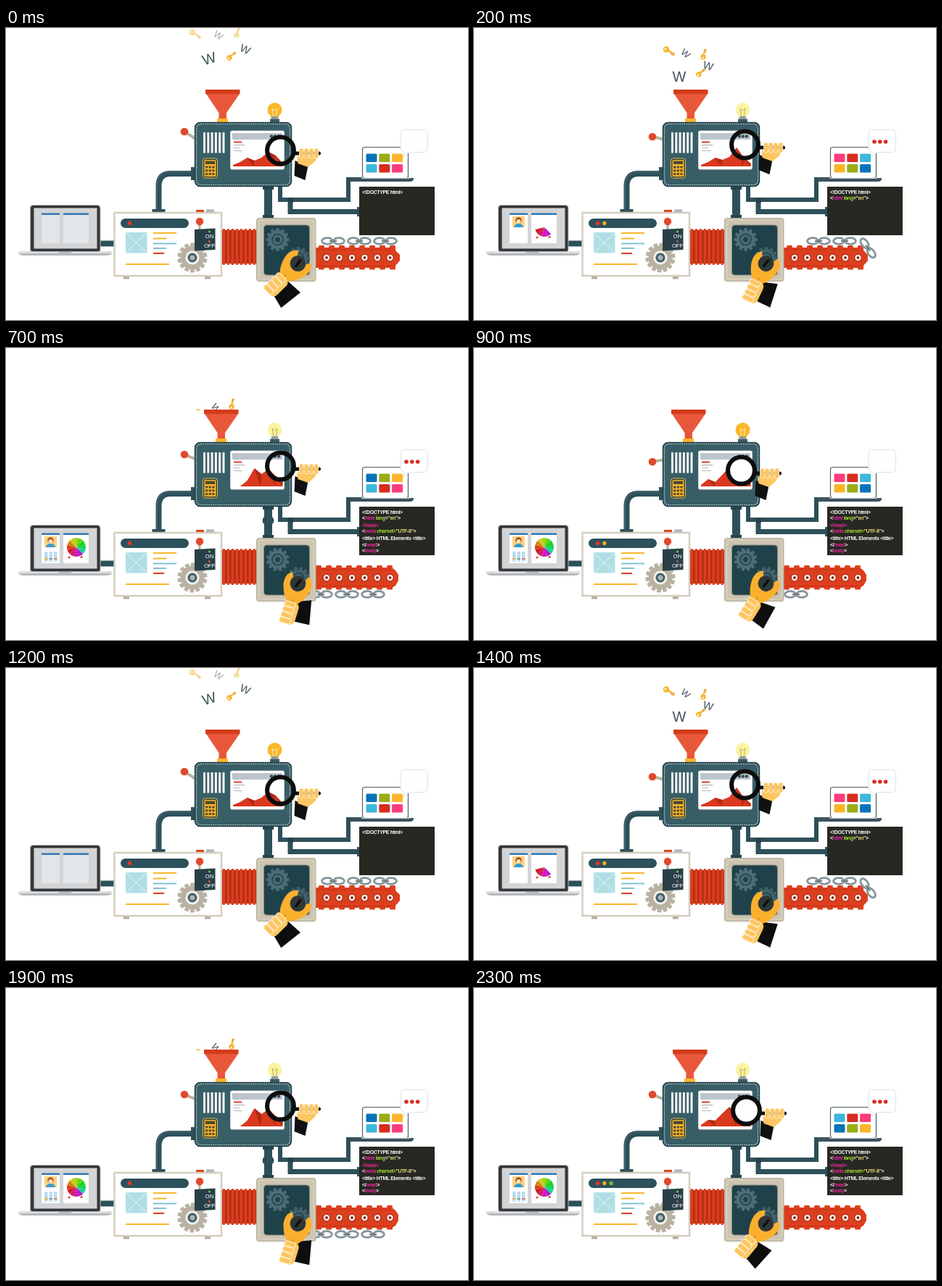
These frames come from a looping animation (637 px wide and 403 px high, 2.4 s). An HTML page:

```html
<!DOCTYPE html>
<html lang="en">
<head>
<meta charset="utf-8">
<title>Web machine</title>
<style>
html, body { margin: 0; width: 100%; height: 100%; overflow: hidden; background: #fff; }
svg { display: block; width: 637px; height: 403px; font-family: "Liberation Sans", Arial, sans-serif; }
</style>
</head>
<body>
<svg id="stage" viewBox="0 0 637 403"></svg>
<script>
const TEAL = '#2d505a', DEEP = '#26434c', RED = '#dc3f1e', DARK_RED = '#b02c15';
const AMBER = '#fbb72b', BEIGE = '#cbc4b1', SKIN = '#fdc662';
const STEP = 100, STEPS = 12;
const KEY_STEPS = [0, 2, 5, 7, 9, 11];

const rect = (x, y, w, h, fill, more = '') =>
  `<rect x="${x}" y="${y}" width="${w}" height="${h}" fill="${fill}" ${more}/>`;
const disc = (x, y, r, fill, more = '') => `<circle cx="${x}" cy="${y}" r="${r}" fill="${fill}" ${more}/>`;
const shape = (d, fill, more = '') => `<path d="${d}" fill="${fill}" ${more}/>`;
const line = (d, color, width, more = '') =>
  `<path d="${d}" fill="none" stroke="${color}" stroke-width="${width}" ${more}/>`;
const group = (transform, body, more = '') => `<g transform="${transform}" ${more}>${body}</g>`;
const label = (x, y, size, body, more = '') =>
  `<text x="${x}" y="${y}" font-size="${size}" ${more}>${body}</text>`;
const range = (n, f) => Array.from({ length: n }, (_, i) => f(i)).join('');

// Linear interpolation through values given at KEY_STEPS
function keyed(s, values) {
  let i = 0;
  while (i < 4 && s > KEY_STEPS[i + 1]) i++;
  const p = (s - KEY_STEPS[i]) / (KEY_STEPS[i + 1] - KEY_STEPS[i]);
  return values[i] + (values[i + 1] - values[i]) * p;
}

function gear(x, y, r, teeth, angle, fill, hub) {
  const spokes = range(teeth, i =>
    rect(-r * .14, -r, r * .28, r, fill, `rx="1" transform="rotate(${i * 360 / teeth})"`));
  return group(`translate(${x} ${y}) rotate(${angle})`, spokes + disc(0, 0, r * .8, fill) + hub);
}

function pie(count) {
  const at = i => {
    const a = (45 + i * 30) * Math.PI / 180;
    return `${97 + 13 * Math.cos(a)} ${275 + 13 * Math.sin(a)}`;
  };
  return range(count, i =>
    shape(`M97 275L${at(i)}A13 13 0 0 1 ${at(i + 1)}Z`, `hsl(${290 + i * 21} 80% 46%)`));
}

function leftLaptop(s) {
  let out = line('M130 297.5H149', TEAL, 8) +
    rect(33.5, 244.5, 96.5, 65, '#343638', 'rx="4" stroke="#b5b8ba"') +
    rect(38.5, 248.5, 87, 56, '#d3d4d5') +
    shape('M17 308.5H146V311Q144 314 138 314H25Q19 314 17 311Z', '#b4b8bb') +
    rect(17, 308.5, 129, 2.5, '#dfe1e2') + rect(72, 308.5, 18, 2, '#a5a8aa');
  for (const [x, w] of [[49, 25], [79, 35]])
    out += rect(x, 256, w, 41, s ? '#fff' : '#e3e6e9') + rect(x, 255.5, w, 2.5, '#2f78b7');
  if (s) out += rect(53, 260, 17, 15, '#ffd27a') + disc(61.5, 265.5, 4.2, '#a84a23') +
    disc(61.5, 267, 3, '#ffe1bd') + shape('M55 275Q56 270 61.5 270T68 275Z', '#3a9bd0');
  if (s > 2) out += range(3, i => rect(53 + i * 6.5, 281, 4.5, 13.5, '#bcdcf0') +
    rect(53 + i * 6.5, 290, 4.5, 2, ['#e8b64a', '#5aa3d0', '#dd7a5c'][i]));
  out += pie(Math.round(keyed(s, [0, 4, 10, 12, 12, 12])));
  if (s > 1) out += disc(87, 289, 1.6, '#e0452a') + disc(104, 288.5, 1.6, '#e0452a');
  return out;
}

function whiteMachine(s) {
  const lamps = Math.floor(s % 6 / 2) + 1;
  const lines = [[203, 283, 32, AMBER], [203, 290.5, 18, AMBER], [203, 297.5, 32, '#7cc4d0'],
    [203, 304, 18, '#7cc4d0'], [203, 311, 15, RED], [165, 326, 60, AMBER]];
  const hub = disc(0, 0, 9.5, '#f4f2ec') + disc(0, 0, 5, '#a9b3b2', 'stroke="#40606a" stroke-width="3"');
  return rect(162, 342, 8, 4.5, '#b8ae99') + rect(274, 342, 8, 4.5, '#b8ae99') +
    rect(262, 251, 11, 4, RED) + rect(276, 250.5, 11, 4.5, '#a9b6c0') +
    rect(149.5, 255, 147.5, 87, '#fff', `stroke="${BEIGE}" stroke-width="2.4"`) +
    rect(149.5, 255, 147.5, 87, 'none', 'stroke="#fff" stroke-dasharray="1 2"') +
    rect(158, 263, 94, 13, TEAL, 'rx="6.5"') +
    range(lamps, i => disc(170.5 + i * 9.3, 269.5, 2.7, ['#e33a22', '#f9a825', '#72c043'][i])) +
    rect(165, 282, 29.5, 28.5, '#b0dee4') + line('M165 282L194.5 310.5M194.5 282L165 310.5', '#e6f6f7', 1) +
    lines.map(([x, y, w, c]) => rect(x, y - 1, w, 2, c)).join('') +
    gear(257, 317, 20.5, 14, s * 15, '#b9b2a3', hub) +
    rect(265.5, 267, 3, 12, '#b3ab9b') +
    shape('M260 278L288.5 276.5V306L260 307.5Z', '#293f48') +
    disc(267, 267, 5.2, '#e2482c') + disc(280.5, 281, 1.6, '#79c447') + disc(280.5, 294.5, 1.4, '#c96a3b') +
    label(280.5, 290, 8, 'ON', 'fill="#fff" text-anchor="middle"') +
    label(280.5, 303, 8, 'OFF', 'fill="#fff" text-anchor="middle" letter-spacing="-.3"');
}

function pipes(s) {
  const bulge = s > 5 && s < 9 ? `<ellipse cx="361.5" cy="${238 + (s - 7) * 11}" rx="8" ry="7" fill="${TEAL}"/>` : '';
  return line('M260 201H227Q210.5 201 210.5 218V254', TEAL, 8) +
    line('M258 198.5H227Q208 199 208 218V250', '#527078', 1) +
    rect(255, 192, 5, 18, TEAL) + rect(201.5, 250, 18, 5, TEAL) +
    line('M378 219V237H472V209H495', TEAL, 6) + line('M392 237V253.5H488', TEAL, 7) +
    rect(389, 234, 7, 7, DEEP) + rect(484, 247, 4, 13, TEAL) +
    rect(356, 219, 11, 44, TEAL) + rect(354, 219, 15, 4, DEEP) + rect(354, 258, 15, 4, DEEP) + bulge;
}

function drops(s) {
  const key = (x, y, a, size = 1) => group(`translate(${x} ${y}) rotate(${a}) scale(${size})`,
    line('M3 0H14M10 0V3M13 0V3', '#eea62c', 2.4) + disc(0, 0, 4.6, '#f7b733') + disc(-1.5, 0, 1.4, '#fff'));
  const letter = (x, y, a, size) => group(`translate(${x} ${y}) rotate(${a})`,
    label(0, size * .36, size, 'W', 'text-anchor="middle" fill="#40535b"'));
  if (s > 7) return '';
  const fade = `opacity="${Math.min(1, .5 + s * .25)}"`;
  const body = `<g ${fade}>` + key(257 + Math.min(s, 2) * 4, 6 + s * 11.8, 30, .95) +
    letter(293 - s * .5, keyed(s, [10, 35, 70, 83, 0, 0]), 35 + s * 3, 13) +
    key(318 - s, keyed(s, [10, 40, 71, 81, 0, 0]), -75 - s, .8) + '</g>' +
    letter(330 - s * 3.5, 29 + s * 11.5, 25 - s * 4, 15) +
    key(308 + s, 41 + s * 11.5, -45, .8) +
    letter(280 + s * 1.5, 42 + s * 12.5, -18 + s * 9, 20);
  return `<clipPath id="sky"><path d="M0 0H637V86H0Z"/></clipPath><g clip-path="url(#sky)">${body}</g>`;
}

function funnel(s) {
  return group(`translate(${Math.round(keyed(s, [0, 0, -2, -2, -3, -1]))} 0)`,
    rect(275, 85, 47.5, 6, '#d33c1d') + shape('M276 91H322L304 117V126H293.5V117Z', '#e9573a') +
    rect(291, 125, 15, 5.5, AMBER));
}

function bulb(lit) {
  const glass = lit ? '#fbb829' : '#fbf3a4';
  return disc(370.5, 113, 10, glass) + shape('M363 117H378L375 125H366Z', glass) +
    line('M367 111L369 123M374 111L372 123M367 111L370.5 114L374 111', lit ? '#fff0c0' : '#b9ae58', 1) +
    rect(366, 122, 9, 3.5, '#8d9aa0') + rect(364, 125.5, 13, 5, '#3e5a65');
}

function chart(s) {
  const poses = [[2, 2, 3, 0, 2, 2], [6, 6, 14, 0, 10, 9], [12, 12, 25, 8, 6, 8], [8, 9, 14, 25, 16, 18],
    [12, 13, 18, 17, 27, 27], [20, 26, 12, 24, 16, 16], [15, 12, 8, 14, 20, 10], [4, 4, 4, 8, 10, 6]];
  const top = poses.map((h, i) => [313 + i * 9.8, 191 - keyed(s, h)]);
  const shade = top.slice(1, 7).map(([x, y], i) => {
    const next = top[i + 2];
    return next[1] > y ? shape(`M${x} ${y}L${next}L${x + 9} 191L${x + 4} ${(y + 191) / 2}Z`, DARK_RED) : '';
  }).join('');
  return shape(`M313 191L${top.join('L')}V191Z`, '#da381f') + shade;
}

function topMachine(s) {
  const leverY = keyed(s, [143, 150, 147, 147, 157, 147]);
  return line(`M246 ${leverY}L263 154`, '#bdb29c', 4) + disc(246, leverY, 5.3, '#df4a2d') +
    drops(s) + funnel(s) + bulb(s % 4 < 2) +
    rect(260.5, 130.5, 133, 88, '#385e67', `rx="7" stroke="${DEEP}" stroke-width="1.5"`) +
    rect(262.5, 132.5, 129, 84, 'none', 'rx="6" stroke="#d3dedf" stroke-width="1.2" stroke-dasharray="1.5 1.5"') +
    range(6, i => rect(272 + i * 5.3, 144, 3, 28.5, '#f3f5f3')) +
    rect(271.5, 180, 20, 27, DEEP, `rx="3" stroke="${AMBER}"`) + rect(273.5, 182, 16, 23, AMBER, 'rx="1.5"') +
    rect(275, 183.5, 13, 4.5, '#4a4a33') +
    range(9, i => rect(275 + i % 3 * 4.6, 190.5 + Math.floor(i / 3) * 4.8, 3.4, 3, '#5d512b')) +
    rect(309.5, 142, 74, 53, '#fff', 'rx="2" stroke="#d4d9da"') + rect(312, 145, 69, 9, '#bcc5cb') +
    range(3, i => disc(366 + i * 5, 149.5, 2.2, '#344f59')) +
    rect(314, 156.5, 11, 2, RED) + rect(314, 161, 15, 1, '#aaa') + rect(314, 165, 9, 1, '#bbb') +
    rect(314, 169, 12, 1, '#bbb') + chart(s);
}

function hand() {
  return rect(-14, -8, 28, 18, SKIN, 'rx="6"') +
    range(4, i => rect(-14 + i * 7, -9, 6.3, 14, SKIN, 'rx="3" stroke="#fff3d2" stroke-width=".9"'));
}

function magnifier(s) {
  const i = s % 6;
  const x = [378.5, 378.5, 373.5, 368.5, 371, 375.5][i], y = [169, 163, 161, 169, 171, 169][i];
  return group(`translate(${x} ${y})`,
    shape('M20 14L38 21L34 41L19 35Z', '#111') +
    line('M20 4L53 4', '#111', 5, 'stroke-linecap="round"') +
    shape('M23 9L31 6H49Q51 14 44 18L38 23L24 18Z', SKIN) +
    range(4, j => rect(26 + j * 6.8, -3, 5.8, 14, SKIN, 'rx="2.8" stroke="#fff3d2" stroke-width=".8"')) +
    disc(0, 0, 18.4, i > 2 ? '#fff' : 'none', 'stroke="#0d0d0d" stroke-width="6"'));
}

function bellows() {
  return range(8, i => rect(298 + i * 6, 279, 6, 46, DARK_RED) +
    rect(298.5 + i * 6, 277, 3.8, 50, RED, 'rx="1.6"'));
}

function gearBox(s) {
  const hub = disc(0, 0, 7.5, 'none', 'stroke="#1f414a" stroke-width="1.6"') + disc(0, 0, 3.5, '#1f414a');
  return rect(345.5, 262.5, 81.5, 87, BEIGE, 'rx="3" stroke="#b5ad99"') +
    rect(348.5, 265.5, 76, 81, 'none', 'stroke="#ddd6c5" rx="2"') +
    rect(355.5, 272, 63, 69, '#1f414a', 'rx="4" stroke="#8f8b7c"') +
    gear(374.5, 292, 16, 12, s * 15, '#4d6d75', hub) +
    gear(403, 318, 16, 12, -s * 15, '#40606a', hub);
}

// Position and heading on the track around the saw bar
function track(d) {
  if (d < 94) return [432 + d, 294, 0];
  if (d > 163) return [526 - (d - 163), 340, 180];
  const a = (d - 94) / 69 * Math.PI;
  return [526 + 21 * Math.sin(a), 317 - 23 * Math.cos(a), a * 180 / Math.PI];
}

function saw(s) {
  const tail = keyed(s, [4, 28, 139, 168, 230, 300]);
  const link = x => `<ellipse cx="${x}" rx="7.5" ry="4.3" fill="none" stroke="#85949a" stroke-width="2.8"/>`;
  const chain = range(3, i => {
    const d = tail + 15 + i * 36;
    if (d > 263) return '';
    const [x, y, a] = track(d);
    return group(`translate(${x} ${y}) rotate(${a})`, link(-8) + link(8) + line('M-5 0H5', '#6f7d83', 2));
  });
  const shift = s % 2 * 4;
  const teeth = range(8, i => rect(431 + i * 14 - shift, 300, 8, 33.5, RED, 'rx="1.5"'));
  return `<clipPath id="bar"><path d="M427 296H550V340H427Z"/></clipPath><g clip-path="url(#bar)">${teeth}</g>` +
    shape(`M427 303H532L537 307L${543 - shift / 2} 313V321L537 328L532 331H427Z`, RED) +
    line('M428 306H531M428 328.5H531', '#c73317', 1.2) +
    range(6, i => disc(442 + i * 17.5, 317, 4.8, '#fff', `stroke="${DARK_RED}" stroke-width="1.3"`) +
      disc(442 + i * 17.5, 317, 2, '#9c2d1d')) + chain;
}

function wrench(s) {
  const angle = keyed(s, [136, 115, 103, 107, 122, 130]), a = angle * Math.PI / 180;
  const x = 402.5, y = 325, hx = x + 42 * Math.cos(a), hy = y + 42 * Math.sin(a);
  const jaw = 'M-13 -12Q-7 -22 8 -18.5Q20 -15 27 -8H42V8H27Q20 15 8 18.5Q-7 22 -13 12L-7 8.5A11 11 0 1 0 -7 -8.5Z';
  return group(`translate(${hx} ${hy}) rotate(${(angle - 107) * 1.6})`,
      shape('M8 -15L31 -17L28 17L6 12Z', '#0e0e0e')) +
    disc(x, y, 10.5, '#303536') + line(`M${x - 4} ${y + 5}L${x + 4} ${y - 5}`, '#0c0c0c', 3) +
    group(`translate(${x} ${y}) rotate(${angle})`, shape(jaw, '#fbb02d') + line('M22 0H30', '#dd9420', 2)) +
    group(`translate(${hx} ${hy}) rotate(${angle - 180}) scale(1.12)`, hand());
}

function rightLaptop(s) {
  const blue = '#0874b8', lime = '#9cac16', gold = '#fbb52a', cyan = '#3bb8dc', red = '#d72d20', pink = '#fb3c7b';
  const tiles = [[blue, lime, gold, cyan, red, pink], [pink, red, cyan, gold, lime, blue],
    [cyan, red, pink, blue, lime, gold]][Math.floor(s % 6 / 2)];
  const dots = s % 4 > 1 ? range(3, i => disc(552 + i * 7.8, 157, 2.8, '#dd2d21')) : '';
  return rect(491.5, 164.5, 63, 43, '#fff', 'rx="3" stroke="#4c5f69" stroke-width="1.2"') +
    tiles.map((c, i) => rect(496.5 + i % 3 * 17.8, 173.5 + Math.floor(i / 3) * 14.5, 15, 11.5, c, 'rx="1.5"')).join('') +
    shape('M474 207H562V209Q561 212 557 212H479Q475 212 474 209Z', '#3d525d') +
    rect(490, 206.5, 66, 1.5, '#c6cdd1') +
    shape('M551 140.5H575Q581.5 140.5 581.5 147V165Q581.5 171.5 575 171.5H556L548 177L549 171Q544 170 544 165V147Q544 140.5 551 140.5Z',
      '#fdfefe', 'stroke="#dde2e5"') + dots;
}

function codePanel(s) {
  const span = (color, text) => `<tspan fill="${color}">${text}</tspan>`;
  const pink = t => span('#e8259f', t), green = t => span('#a6e22e', t), sand = t => span('#e6db74', t);
  const rows = [
    [229, '&lt;!DOCTYPE html&gt;'],
    [236.5, '&lt;' + pink('html ') + green('lang') + '=' + sand('"en"') + '&gt;'],
    [247, pink('&lt;head&gt;')],
    [254.5, '&lt;' + pink('meta ') + green('charset=') + sand('"UTF-8"') + '&gt;'],
    [265, '&lt;title&gt; HTML Elements &lt;title&gt;'],
    [273.5, '&lt;/' + pink('head') + '&gt;'],
    [281.5, '&lt;' + pink('body') + '&gt;']];
  return rect(487, 219, 104, 67, '#272822') + rows.slice(0, Math.max(1, s)).map(([y, text]) =>
    label(491, y, 7, text, 'fill="#fff" font-weight="bold" letter-spacing="-.35"')).join('');
}

const parts = [pipes, leftLaptop, whiteMachine, topMachine, magnifier, bellows, saw, gearBox, wrench, rightLaptop, codePanel];
const stage = document.getElementById('stage');
const start = performance.now();
let shown = -1;

function tick() {
  const s = Math.floor((performance.now() - start) / STEP) % STEPS;
  if (s !== shown) stage.innerHTML = parts.map(part => part(s)).join('');
  shown = s;
  requestAnimationFrame(tick);
}
tick();
</script>
</body>
</html>
```
